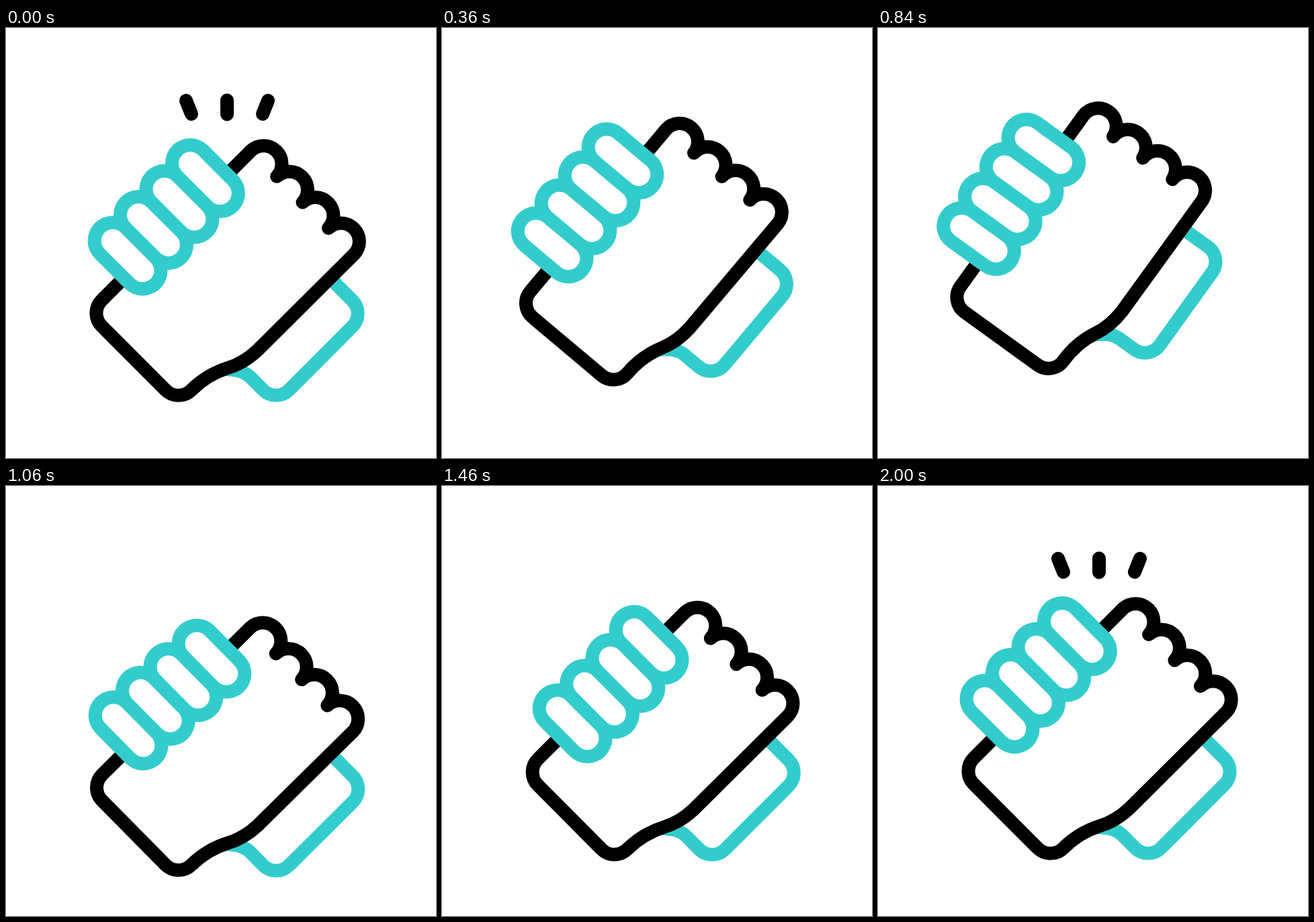
Recreate the animation shown at these times as an HTML page. Size 640 by 640 pixels, loop 2020 ms.

```html
<!DOCTYPE html>
<html lang="en">
<head>
<meta charset="utf-8">
<title>Handshake</title>
<style>
  html, body { margin: 0; width: 100%; height: 100%; overflow: hidden; background: #fff; }
  svg { display: block; width: 100%; height: 100%; }
</style>
</head>
<body>
<svg viewBox="0 0 640 640" fill="none" stroke="#000" stroke-width="20" stroke-linecap="round" stroke-linejoin="round">
  <g id="grip">
    <path stroke="#33cccc" d="M460 350L515.5 405.6A27.2 27.2 0 0 1 515.5 444.4L421.3 538.8A27.2 27.2 0 0 1 382.7 538.8L364 520C355 511 345 509 328 508"/>
    <path id="hand" fill="#fff"/>
    <path id="fingers" stroke="#33cccc" stroke-width="74.6"/>
    <path id="nails" stroke="#fff" stroke-width="34.4"/>
    <path id="sparks"/>
  </g>
</svg>
<script>
const LOOP = 2020;
const STEP = 38.45;   // distance between neighbouring knuckles on each axis
const RADIUS = 27.2;
const [grip, hand, fingers, nails, sparks] =
  ['grip', 'hand', 'fingers', 'nails', 'sparks'].map(id => document.getElementById(id));

// Spark lines, from the hand outwards
const SPARKS = [[276, 128, 268, 108], [329, 128.5, 329, 107.5], [382, 128, 390, 108]];

// Swing keys: time, lift, angle
const SWING = [[0, 0, 0], [757, -50.5, -10.7], [1153, 37, 2], [1506, 0, 0], [LOOP, 0, 0]];

const mix = (a, b, p) => a + (b - a) * p;

function ease(t, from, to) {
  const u = Math.min(1, Math.max(0, (t - from) / (to - from)));
  return u * u * (3 - 2 * u);
}

function swing(t) {
  const i = SWING.findIndex((key, n) => n && t <= key[0]);
  const a = SWING[i - 1], b = SWING[i];
  const p = ease(t, a[0], b[0]);
  return [mix(a[1], b[1], p), mix(a[2], b[2], p)];
}

// Rises to 1 and falls back, as the fingers loosen and grip again
const pulse = t => ease(t, 760, 1330) - ease(t, 1330, 1730);

function handPath(slide) {
  const arc = (x, y) => `A${RADIUS} ${RADIUS} 0 0 1 ${x} ${y}`;
  const x = 364.6 - slide, y = 182.6 + slide;
  let d = `M${x} ${y}`;
  for (let i = 1; i <= 4; i++) d += arc(x + STEP * i, y + STEP * i);
  return d + 'L374 480C360 493 347 501 330 506C308 513 292 523 276 538.8' +
    arc(237.4, 538.8) + 'L142.6 443.8' + arc(142.6, 405) + 'Z';
}

function fingerPath(t) {
  let d = '';
  for (let i = 0; i < 4; i++) {
    const slide = 15 * pulse(t - 90 * i);
    d += `M${274.2 - STEP * i + slide} ${201.4 + STEP * i + slide}l44.4 44.4`;
  }
  return d;
}

function sparkPath(t) {
  const early = t < 750;
  const start = early ? ease(t, 0, 200) : 0;
  const end = early ? 1 : ease(t, 1494, 1725);
  if (end - start < 0.005) return '';
  return SPARKS.map(([x1, y1, x2, y2]) =>
    `M${mix(x1, x2, start)} ${mix(y1, y2, start)}L${mix(x1, x2, end)} ${mix(y1, y2, end)}`).join('');
}

function draw(t) {
  const [lift, angle] = swing(t);
  grip.setAttribute('transform', `translate(0 ${lift}) rotate(${angle} 257 538)`);
  hand.setAttribute('d', handPath(5 * pulse(t)));
  const d = fingerPath(t);
  fingers.setAttribute('d', d);
  nails.setAttribute('d', d);
  sparks.setAttribute('d', sparkPath(t));
}

const begin = performance.now();
function frame() {
  draw((performance.now() - begin) % LOOP);
  requestAnimationFrame(frame);
}
frame();
</script>
</body>
</html>
```
